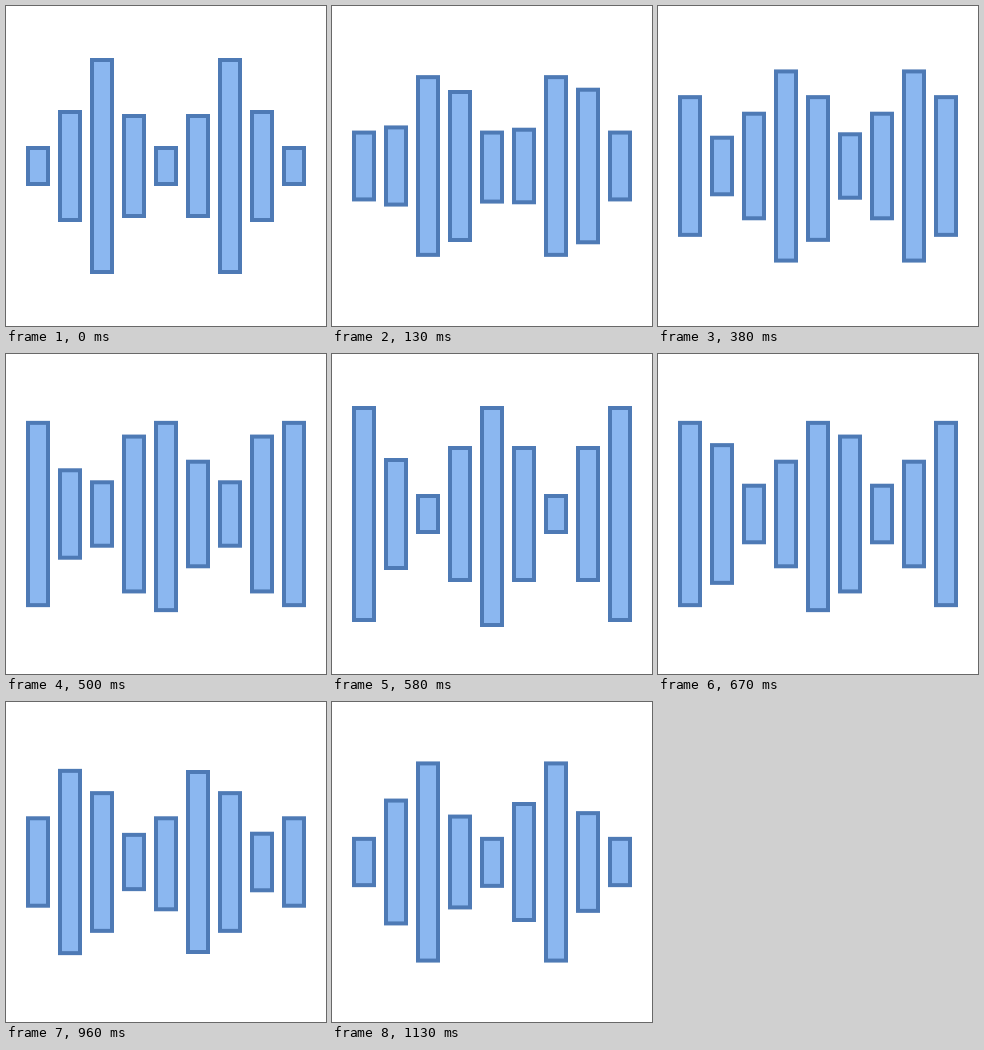
Write an HTML page that moves like this. It is 320 px wide and 320 px high and loops after 1180 ms.

```html
<!DOCTYPE html>
<html lang="en">
<head>
<meta charset="utf-8">
<title>Sound bars</title>
<style>
  html, body { margin: 0; height: 100%; overflow: hidden; background: #fff; }
  svg { display: block; width: 100%; height: 100%; }
  rect { fill: #8bb7f0; stroke: #4e7ab5; stroke-width: 4; }
</style>
</head>
<body>
<svg viewBox="0 0 320 320"></svg>
<script>
const LOOP = 1180, FPS = 24, FRAMES = 28, STEP = 7;
const BARS = 9, CENTRE = 4, MID = 160;
const SHORT = 20, MEDIUM = 56, TALL = 108;

// For each quarter pose: half height of the inner medium bars, last inner bar
const poses = [[52, 6], [68, 7], [68, 7], [56, 7]];

// A wave of short, medium, tall, medium moves one bar to the right per pose
function halfHeight(i, pose) {
  const phase = (pose - i + 2 * CENTRE) % 4;
  if (phase === 0) return SHORT;
  if (phase === 2) return TALL;
  const [level, last] = poses[pose];
  return i % 4 && i > 1 && i <= last ? level : MEDIUM;
}

// The centre bar hangs slightly lower unless it is short
const sag = (i, pose) => i === CENTRE && pose ? 5 : 0;

const svg = document.querySelector('svg');
const bars = Array.from({ length: BARS }, (_, i) => {
  const bar = document.createElementNS(svg.namespaceURI, 'rect');
  bar.setAttribute('x', 22 + 32 * i);
  bar.setAttribute('width', 20);
  return svg.appendChild(bar);
});

function tween(value, i, frame) {
  const pose = Math.floor(frame / STEP), p = frame % STEP / STEP;
  const from = value(i, pose), to = value(i, (pose + 1) % poses.length);
  return from + (to - from) * p;
}

// 24 frames a second, with frame starts rounded to 10 ms
function frameAt(ms) {
  const t = Math.floor(ms % LOOP / 10) * 10;
  return Math.min(FRAMES - 1, Math.floor((t + 4) * FPS / 1000));
}

function draw() {
  const frame = frameAt(performance.now());
  bars.forEach((bar, i) => {
    const half = tween(halfHeight, i, frame);
    bar.setAttribute('y', MID - half + 2);
    bar.setAttribute('height', 2 * half + tween(sag, i, frame) - 4);
  });
  requestAnimationFrame(draw);
}
draw();
</script>
</body>
</html>
```
